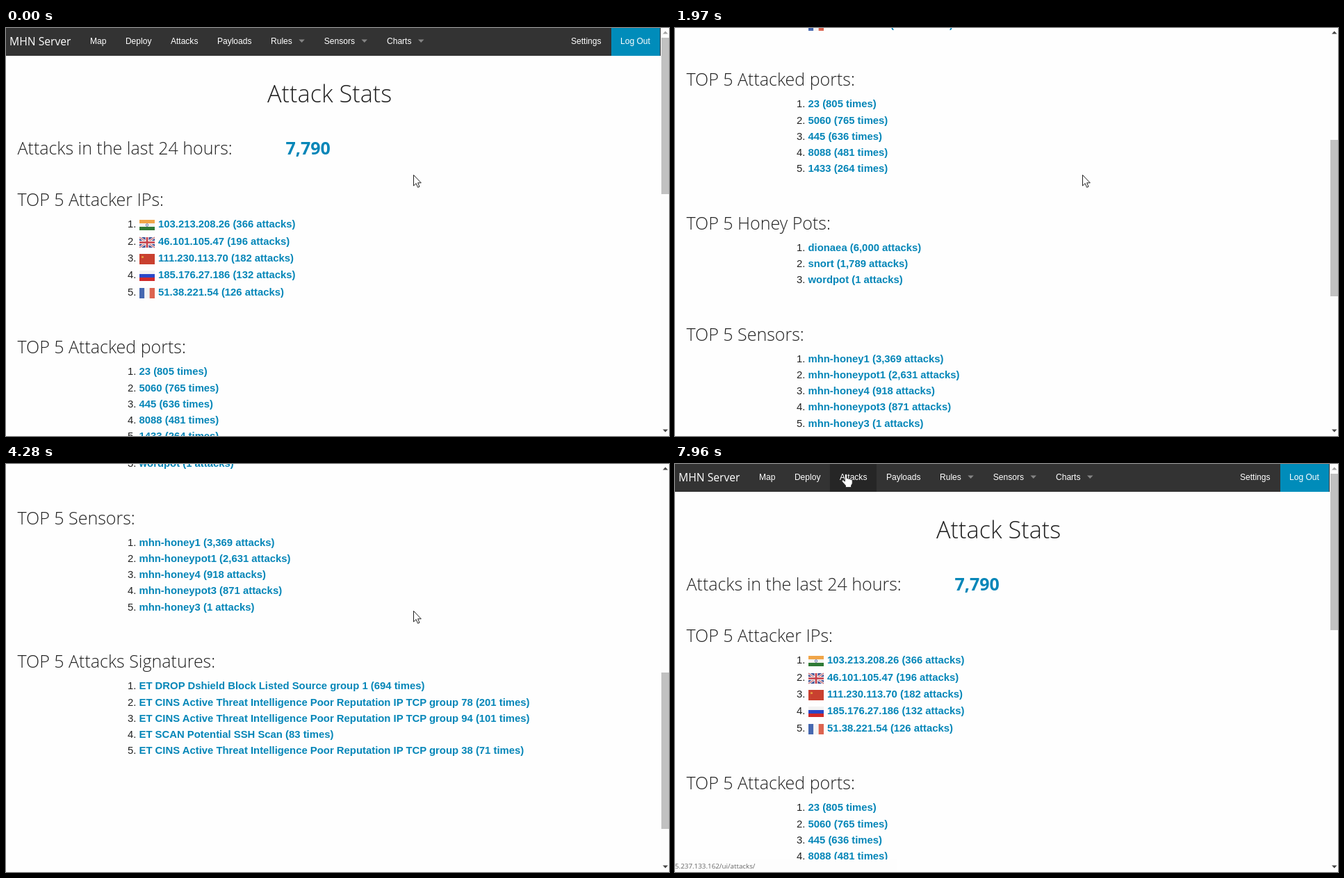
Recreate the animation shown at these times as an HTML page. Size 954 by 587 pixels, loop 8000 ms.

```html
<!DOCTYPE html>
<html lang="en">
<head>
<meta charset="utf-8">
<title>Attack Stats</title>
<style>
  html, body { margin: 0; width: 100%; height: 100%; overflow: hidden; background: #fefefe; }
  svg { display: block; width: 954px; height: 587px; }
  text { white-space: pre; }
  .nav { font: 12.05px "Liberation Sans", Arial, sans-serif; fill: #fff; }
  .brand { font: 15.7px "Open Sans", sans-serif; fill: #fff; }
  .title { font: 300 34.3px "Open Sans", sans-serif; fill: #222; }
  .head { font: 300 25px "Open Sans", sans-serif; fill: #222; }
  .total { font: 700 25px "Open Sans", sans-serif; fill: #0586b8; }
  .num { font: 14.86px "Liberation Sans", Arial, sans-serif; fill: #222; }
  .link { font: 700 14.86px "Liberation Sans", Arial, sans-serif; fill: #0586b8; }
  .status { font: 9.8px "Open Sans", sans-serif; fill: #666; }
</style>
</head>
<body>
<svg viewBox="0 0 954 587">
  <rect width="954" height="587" fill="#fefefe"/>
  <g id="page"></g>
  <g id="status">
    <rect y="569" width="320" height="18" fill="#fdfdfd"/>
    <text class="status" x="0" y="582">5.237.133.162/ui/attacks/</text>
  </g>
  <rect x="942" width="12" height="587" fill="#fdfdfd"/>
  <rect id="thumb" x="943" width="11" height="225" fill="#c1c1c1"/>
  <path id="up" d="M945 8.500h7.500l-3.750-4z"/>
  <path d="M945 577.500h7.500l-3.750 4z" fill="#444"/>
  <path id="arrow" d="M.5.5v15.500l3.600-3.400 2.500 5.700 2.400-1.100-2.400-5.400h4.700z" fill="#fff" stroke="#222"/>
  <path id="hand" d="M2.500 11V2q0-1.700 1.500-1.700T5.500 2v5q1.500-1 2.500.6 1.600-.8 2.500.7 2.500-.6 2.700 1.700v4l-1.700 3v2.500H3.500V17L-.5 12.500q-2.400-2.700-.7-3.500 1.300-.5 3.700 2z" fill="#fff" stroke="#222" stroke-width=".8"/>
</svg>
<script>
const $ = id => document.getElementById(id);
const rect = (x, y, w, h, fill, extra = '') =>
  `<rect x="${x}" y="${y}" width="${w}" height="${h}" fill="${fill}" ${extra}/>`;
const text = (cls, x, y, s) => `<text class="${cls}" x="${x}" y="${y}">${s}</text>`;

// Flags are 22 by 15, drawn from their top left corner
const stripes = (colors, vertical) => colors.map((c, i) =>
  vertical ? rect(i * 22 / 3, 0, 22 / 3, 15, c) : rect(0, i * 5, 22, 5, c)).join('');
const bars = (d, color, width) => `<path d="${d}" stroke="${color}" stroke-width="${width}"/>`;
const cross = 'M11 0V15M0 7.500H22', saltire = 'M0 0L22 15M22 0L0 15';
const flags = [
  stripes(['#f0a548', '#f4f4f0', '#2f7a35']) + '<circle cx="11" cy="7.500" r="1.700" fill="none" stroke="#5c6ca8"/>',
  rect(0, 0, 22, 15, '#3d4f94') + bars(saltire, '#eee', 3) + bars(saltire, '#c8404a', 1) +
    bars(cross, '#eee', 5) + bars(cross, '#c8404a', 2.6),
  rect(0, 0, 22, 15, '#c9402f') + '<circle cx="4.500" cy="4.500" r="1.600" fill="#e8a040"/>',
  stripes(['#f2f2f2', '#2a48c8', '#d02a2a']),
  stripes(['#4668b0', '#f4f4f4', '#dc6450'], true),
];

const sections = {
  'Attacker IPs': ['103.213.208.26 (366 attacks)', '46.101.105.47 (196 attacks)',
    '111.230.113.70 (182 attacks)', '185.176.27.186 (132 attacks)', '51.38.221.54 (126 attacks)'],
  'Attacked ports': ['23 (805 times)', '5060 (765 times)', '445 (636 times)',
    '8088 (481 times)', '1433 (264 times)'],
  'Honey Pots': ['dionaea (6,000 attacks)', 'snort (1,789 attacks)', 'wordpot (1 attacks)'],
  'Sensors': ['mhn-honey1 (3,369 attacks)', 'mhn-honeypot1 (2,631 attacks)',
    'mhn-honey4 (918 attacks)', 'mhn-honeypot3 (871 attacks)', 'mhn-honey3 (1 attacks)'],
  'Attacks Signatures': ['ET DROP Dshield Block Listed Source group 1 (694 times)',
    'ET CINS Active Threat Intelligence Poor Reputation IP TCP group 78 (201 times)',
    'ET CINS Active Threat Intelligence Poor Reputation IP TCP group 94 (101 times)',
    'ET SCAN Potential SSH Scan (83 times)',
    'ET CINS Active Threat Intelligence Poor Reputation IP TCP group 38 (71 times)'],
};

const pen = document.createElement('canvas').getContext('2d');
pen.font = '12.05px "Liberation Sans", Arial, sans-serif';

// Lays menu labels side by side; a trailing "+" marks a dropdown
function menu(x, labels) {
  let out = '';
  for (const entry of labels) {
    const label = entry.replace('+', ''), width = pen.measureText(label).width;
    if (label === 'Attacks') out += rect(x - 14, 0, width + 27.5, 40, '#262626', 'id="hover"');
    out += text('nav', x, 23, label);
    x += width + 27.5;
    if (label !== entry) {
      out += `<path d="M${x - 18} 16.500h8.500l-4.250 4.500z" fill="#858585"/>`;
      x += 18.5;
    }
  }
  return out;
}

function buildPage() {
  let out = rect(0, 0, 942, 40, '#333') + rect(871, 0, 70, 40, '#008cba') +
    text('brand', 5, 25, 'MHN Server') +
    menu(121, ['Map', 'Deploy', 'Attacks', 'Payloads', 'Rules+', 'Sensors+', 'Charts+']) +
    menu(813, ['Settings', 'Log Out']) +
    text('title', 376, 107, 'Attack Stats') +
    text('head', 16.5, 182, 'Attacks in the last 24 hours:') + text('total', 402.5, 182, '7,790');
  let y = 256.3;
  for (const [name, items] of Object.entries(sections)) {
    const flagged = name === 'Attacker IPs';
    out += text('head', 16.5, Math.round(y), `TOP 5 ${name}:`);
    y += 31;
    items.forEach((item, i) => {
      const base = Math.round(y);
      if (flagged) out += `<g transform="translate(192 ${base - 11})">${flags[i]}</g>`;
      out += text('num', 175, base, i + 1 + '.') + text('link', flagged ? 219 : 191.5, base, item);
      y += flagged ? 24.3 : 23.17;
    });
    y += 59.6;
  }
  $('page').innerHTML = out;
}

// Share of a move done by time t: seen first at `first`, already `lead` ms under way,
// then refreshed every 130 ms until `length` ms have passed
const glide = (t, first, lead, length) =>
  t < first ? 0 : Math.min(1, (lead + 130 * Math.floor((t - first) / 130)) / length);
const smooth = k => k * k * (3 - 2 * k);

const scrollAt = t => Math.round(
  100 * glide(t, 180, 60, 360) + 300 * glide(t, 1450, 221, 780) + 400 * glide(t, 3300, 96, 570) -
  200 * glide(t, 4280, 80, 310) - 600 * glide(t, 4940, 80, 680));

function cursorAt(t) {
  const nudge = glide(t, 5670, 130, 300), toMenu = smooth(glide(t, 6390, 90, 700));
  return [587 - 14 * nudge - 330 * toMenu, 211 + 3 * nudge - 200 * toMenu].map(Math.round);
}

function draw(now) {
  const t = now % 8000;
  const scroll = scrollAt(t), [x, y] = cursorAt(t);
  const hovering = y < 40;
  $('page').setAttribute('transform', `translate(0 ${-scroll})`);
  $('thumb').setAttribute('y', Math.round(14 + scroll * 0.382));
  $('up').setAttribute('fill', scroll ? '#444' : '#a3a3a3');
  for (const id of ['hover', 'status', 'hand']) $(id).style.display = hovering ? '' : 'none';
  $('arrow').style.display = hovering ? 'none' : '';
  for (const id of ['arrow', 'hand']) $(id).setAttribute('transform', `translate(${x - 1} ${y})`);
  requestAnimationFrame(draw);
}

buildPage();
requestAnimationFrame(draw);
</script>
</body>
</html>
```
